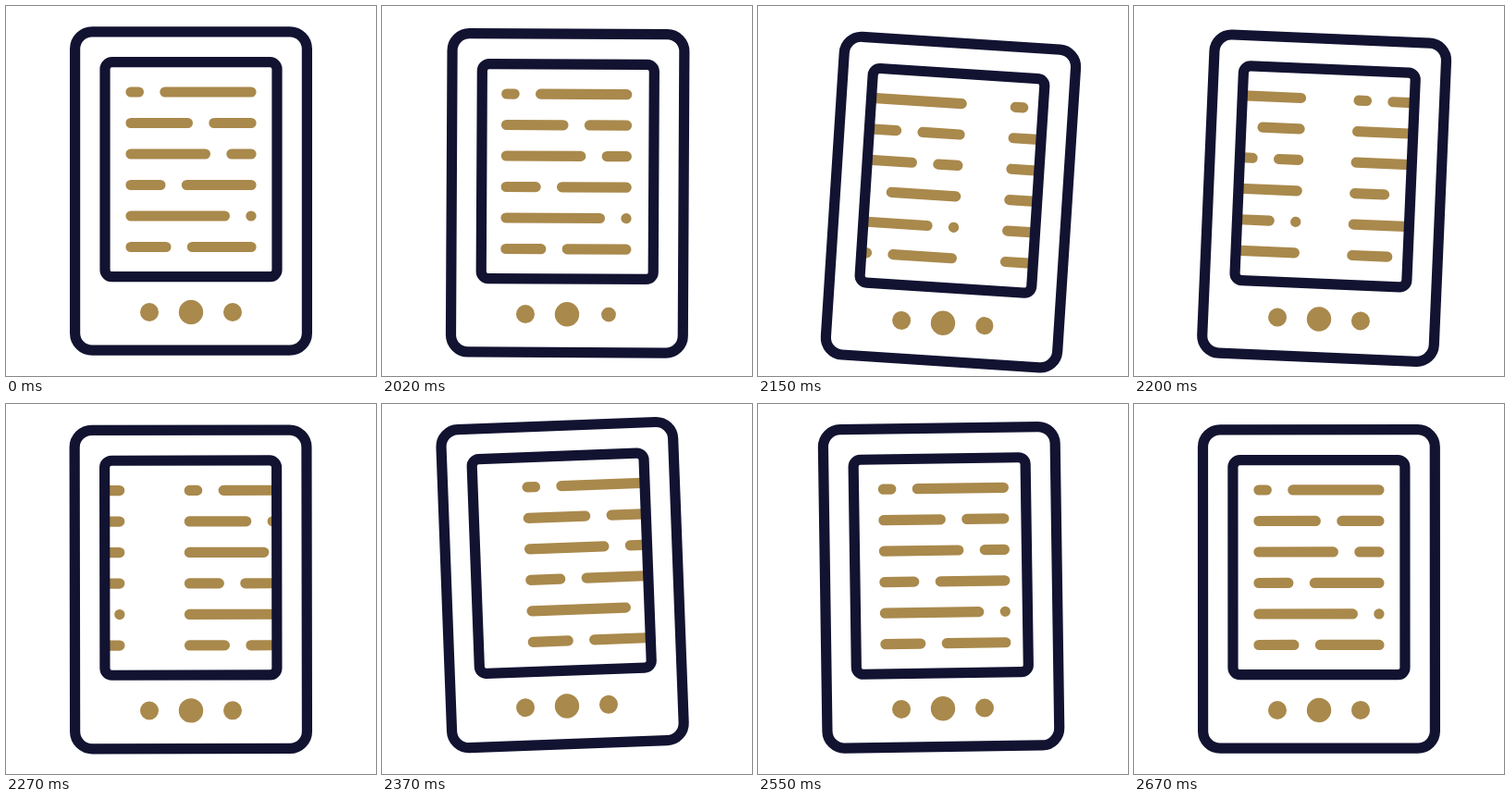
An HTML page with a canvas for the animation above (2700 ms loop, 400 px wide and 400 px high).

```html
<!DOCTYPE html>
<html>
<head>
<meta charset="utf-8">
<style>
  html, body { margin: 0; width: 100%; height: 100%; overflow: hidden; background: #fff; }
  canvas { display: block; }
</style>
</head>
<body>
<canvas id="stage" width="400" height="400"></canvas>
<script>
const ctx = document.getElementById('stage').getContext('2d');
const LOOP = 2700, START = 2000, PAGE = 188;
const NAVY = '#121331', GOLD = '#a9894c';
const pivot = { x: 200, y: 331 };

// Right end of the first dash in each row
const breaks = [149, 202, 221, 172.5, 242, 178.5];

// Keyframes as [ms after START, value]
const tilt = [[0, 0], [125, 3.9], [365, -2.15], [690, 0]];
const drop = [[0, 0], [80, 13.6], [100, 13.6], [360, -4.5], [690, 0]];
const press = [[0, 10], [33, 7], [100, 7], [167, 10]];

const clamp = x => Math.min(1, Math.max(0, x));
const smooth = x => x * x * (3 - 2 * x);

function at(keys, t) {
  let value = keys[0][1];
  for (let i = 1; i < keys.length; i++) {
    const [t0, v0] = keys[i - 1], [t1, v1] = keys[i];
    if (t >= t0) value = v0 + (v1 - v0) * smooth(clamp((t - t0) / (t1 - t0)));
  }
  return value;
}

// cubic-bezier(.235, 0, .263, 1)
function glide(x) {
  let lo = 0, hi = 1;
  for (let i = 0; i < 24; i++) {
    const s = (lo + hi) / 2, r = 1 - s;
    if (3 * r * r * s * 0.235 + 3 * r * s * s * 0.263 + s ** 3 < x) lo = s;
    else hi = s;
  }
  return smooth(hi);
}

function box(x, y, w, h, r) {
  ctx.beginPath();
  ctx.roundRect(x, y, w, h, r);
}

function dot(x, r) {
  ctx.beginPath();
  ctx.arc(x, pivot.y, r, 0, 2 * Math.PI);
  ctx.fill();
}

function page(dx) {
  ctx.beginPath();
  breaks.forEach((end, i) => {
    const y = 93 + 33.5 * i;
    for (const [a, b] of [[135, end - 5.6], [end + 22.9, 265]]) {
      ctx.moveTo(a + dx, y);
      ctx.lineTo(b + dx, y);
    }
  });
  ctx.stroke();
}

function draw(t) {
  ctx.fillStyle = '#fff';
  ctx.fillRect(0, 0, 400, 400);
  ctx.save();
  ctx.translate(pivot.x, pivot.y + at(drop, t));
  ctx.rotate(at(tilt, t) * Math.PI / 180);
  ctx.translate(-pivot.x, -pivot.y);
  ctx.lineWidth = 11.2;
  ctx.lineCap = 'round';

  ctx.save();
  box(107, 60.7, 186, 232, 7.5);
  ctx.clip();
  ctx.strokeStyle = GOLD;
  page(-PAGE * smooth(clamp(t / 400)));
  page(PAGE * (1 - glide(clamp(t / 667))));
  ctx.restore();

  ctx.strokeStyle = NAVY;
  box(107, 60.7, 186, 232, 7.5);
  ctx.stroke();
  box(74.6, 27.8, 250.8, 344.4, 18.5);
  ctx.stroke();

  ctx.fillStyle = GOLD;
  dot(155, 10);
  dot(200, 13.2);
  dot(245, at(press, t));
  ctx.restore();
}

const begin = performance.now();
function tick() {
  draw(Math.max(0, (performance.now() - begin) % LOOP - START));
  requestAnimationFrame(tick);
}
tick();
</script>
</body>
</html>
```
